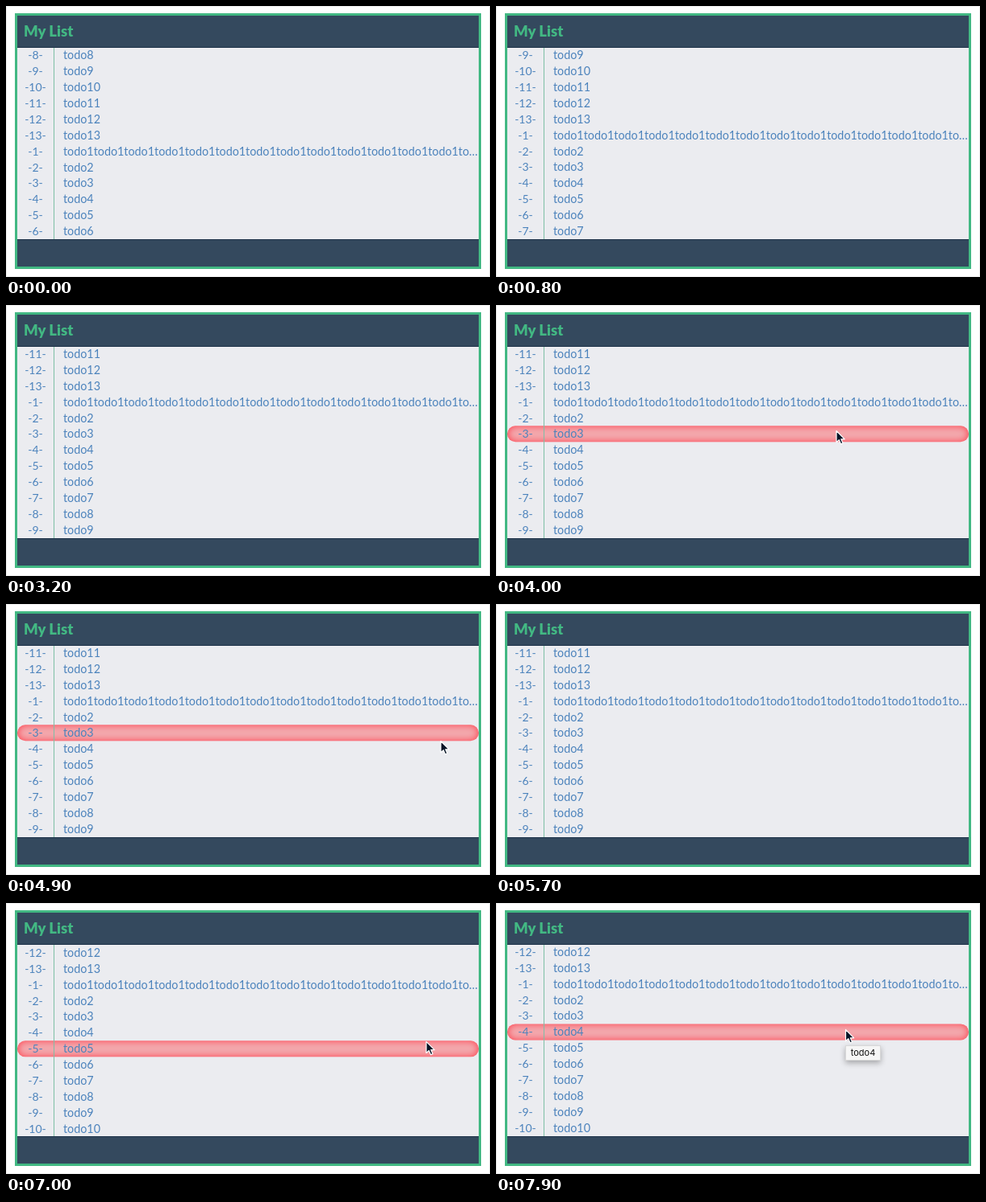
Animation of 600x337 px, one loop 8 s. Source, as an HTML page:

```html
<!DOCTYPE html>
<html lang="en">
<head>
<meta charset="utf-8">
<title>My List</title>
<style>
  html, body { margin: 0; width: 100%; height: 100%; overflow: hidden; background: #fff; }
  #stage { position: relative; width: 600px; height: 337px; overflow: hidden; background: #fff;
    box-shadow: inset 0 0 0 1px #ededed; font-family: Lato, sans-serif; }
  #stage div, #stage svg { position: absolute; box-sizing: border-box; }
  #card { left: 11px; top: 9px; width: 578px; height: 318px; border: 3px solid #42b883; background: #34495e; }
  #title { left: 22px; top: 20px; font-size: 18.5px; line-height: 22px; font-weight: 900;
    color: #42b883; white-space: nowrap; }
  #list { left: 14px; top: 52px; width: 572px; height: 238px; overflow: hidden; background: #ebecf0; }
  .edge { left: 14px; width: 572px; height: 1px; background: #1c3147; }
  #rows { left: 0; top: -0.8px; width: 572px; }
  .row { left: 0; width: 572px; height: 20px; border-radius: 10px; font-size: 14.33px;
    line-height: 19.9px; color: #4c83bc; white-space: nowrap; overflow: hidden; }
  .row.hover { background: #f3a9ae; box-shadow: inset 0 0 10px #ff3b48; }
  .num { left: 0; top: 0; width: 45px; text-align: center; font-size: 14px; }
  .text { left: 57px; top: 0; }
  #divider { left: 45px; top: 0; width: 1px; height: 238px; background: #7fbfa6; }
  #tip { left: 433px; top: 177px; width: 44px; height: 19px; border: 1px solid #d8d8d8;
    background: #f6f6f6; box-shadow: 0 3px 7px rgba(0, 0, 0, .3); color: #111;
    font: 11px/17px Inter, sans-serif; text-align: center; }
  #cursor { left: 0; top: 0; overflow: visible; }
</style>
</head>
<body>
<div id="stage">
  <div id="card"></div>
  <div id="title">My List</div>
  <div id="list"><div id="rows"></div><div id="divider"></div></div>
  <div class="edge" style="top:51px"></div>
  <div class="edge" style="top:290px"></div>
  <div id="tip">todo4</div>
  <svg id="cursor" width="14" height="20">
    <path d="M0 0V14.2L3.3 11.2L5.6 16.4L8 15.3L5.8 10.3H10.2Z"
      fill="#061426" stroke="#fff" stroke-width="1.2" stroke-linejoin="round"/>
  </svg>
</div>
<script>
const LOOP = 8000, STEP = 100;
const ITEMS = 13, FIRST = 8, ROW = 19.9, LIST_TOP = 51.2, LIST_BOTTOM = 290;
const SCROLL_STARTS = [50, 1430, 2800, 6683], SCROLL_TIME = 333;
const TIP_AT = 7800;

// Pointer visits: each point is [time, x, y].
const VISITS = [
  [[3250, 448, 300], [3500, 438, 250], [3800, 424, 166], [4000, 422, 156.5],
   [4300, 426, 157], [4700, 500, 165], [5100, 578, 176], [5400, 612, 180]],
  [[6850, 612, 186], [6900, 574, 182], [7000, 521, 172.3], [7200, 448, 160],
   [7300, 433.5, 157.5], [LOOP, 433.5, 157.5]]
];

const $ = id => document.getElementById(id);
const clamp = v => Math.max(0, Math.min(1, v));

function addDiv(parent, className, text = "") {
  const div = document.createElement("div");
  div.className = className;
  div.textContent = text;
  return parent.appendChild(div);
}

const rows = Array.from({ length: 17 }, (_, i) => {
  const n = (FIRST - 1 + i) % ITEMS + 1;
  const row = addDiv($("rows"), "row");
  row.style.top = i * ROW + "px";
  addDiv(row, "num", `-${n}-`);
  addDiv(row, "text", n === 1 ? "todo1".repeat(13) + "to…" : "todo" + n);
  return row;
});

function pointerAt(t) {
  const path = VISITS.find(p => t >= p[0][0] && t <= p[p.length - 1][0]);
  if (!path) return null;
  const i = Math.max(1, path.findIndex(p => p[0] >= t));
  const [t0, x0, y0] = path[i - 1], [t1, x1, y1] = path[i];
  const k = (t - t0) / (t1 - t0);
  return { x: x0 + (x1 - x0) * k, y: y0 + (y1 - y0) * k };
}

function draw(t) {
  const scroll = SCROLL_STARTS.reduce((sum, start) => sum + clamp((t - start) / SCROLL_TIME), 0);
  $("rows").style.transform = `translateY(${-scroll * ROW}px)`;

  const p = pointerAt(t);
  const inside = p && p.x >= 14 && p.x < 586 && p.y >= LIST_TOP && p.y < LIST_BOTTOM;
  const hovered = inside ? Math.floor((p.y - LIST_TOP) / ROW + scroll) : -1;
  rows.forEach((row, i) => row.classList.toggle("hover", i === hovered));

  $("cursor").style.display = p ? "block" : "none";
  if (p) $("cursor").style.transform = `translate(${p.x}px, ${p.y}px)`;
  $("tip").style.display = t >= TIP_AT ? "block" : "none";
}

function tick() {
  draw(Math.floor(performance.now() % LOOP / STEP) * STEP);
  requestAnimationFrame(tick);
}
tick();
</script>
</body>
</html>
```
